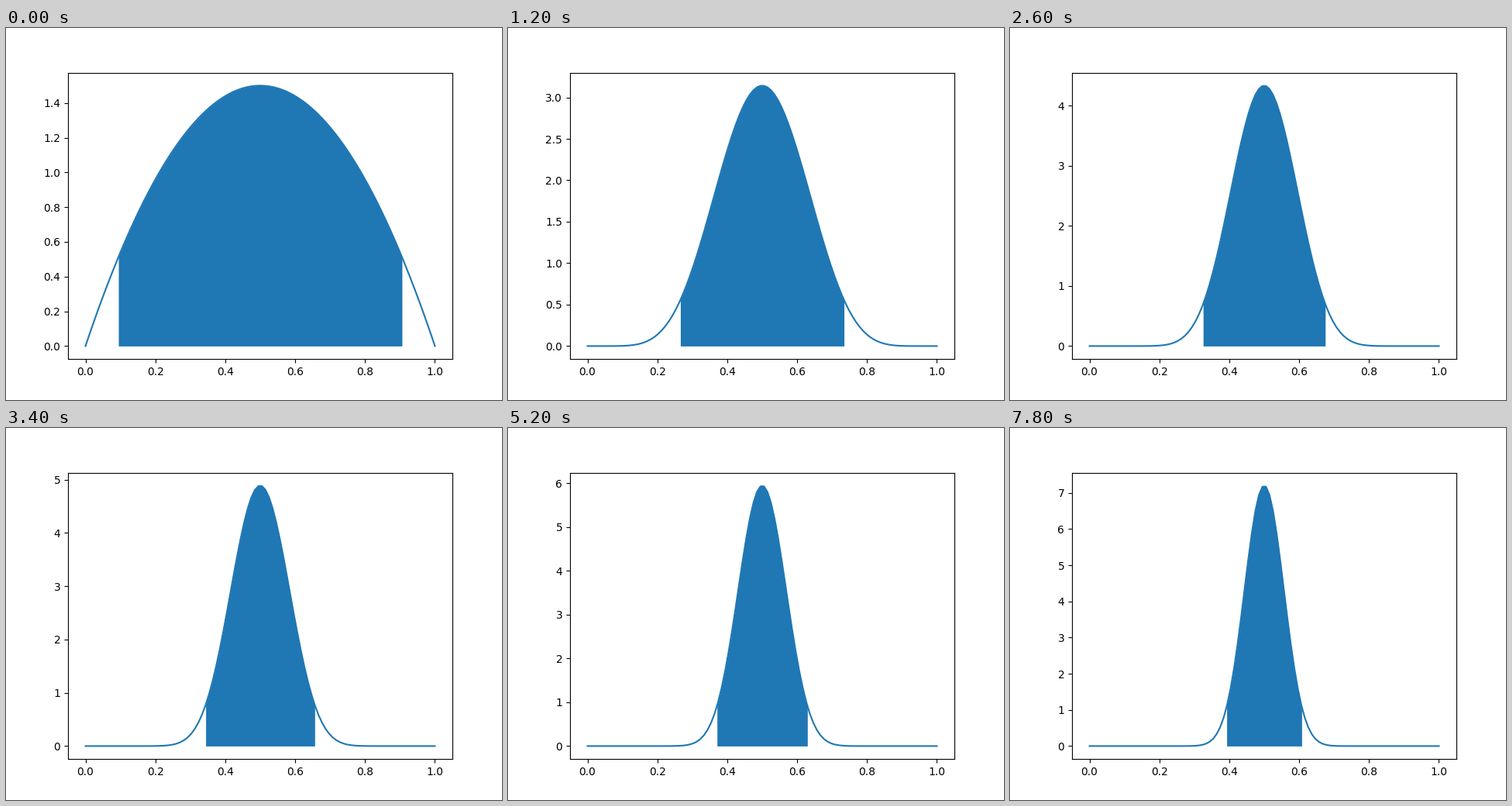
A matplotlib script for the animation above (8 s loop, 640x480 px).

```python
import math

import numpy as np
import matplotlib.pyplot as plt
from matplotlib.animation import FuncAnimation

FRAMES = 40
INTERVAL = 200
BLUE = "#1f77b4"

fig, ax = plt.subplots(figsize=(6.4, 4.8), dpi=100)
grid = np.linspace(0, 1, 100)
fine = np.linspace(0, 1, 40001)


def beta_pdf(x, a, b):
    norm = math.exp(math.lgamma(a + b) - math.lgamma(a) - math.lgamma(b))
    return norm * x ** (a - 1) * (1 - x) ** (b - 1)


def central_interval(a, b, mass=0.95):
    """Bounds of the central interval, from a numerically integrated CDF."""
    p = beta_pdf(fine, a, b)
    cdf = np.concatenate([[0], np.cumsum((p[1:] + p[:-1]) / 2)])
    cdf /= cdf[-1]
    tail = (1 - mass) / 2
    return np.interp([tail, 1 - tail], cdf, fine)


def draw(i):
    a = b = i + 2
    ax.clear()
    ax.plot(grid, beta_pdf(grid, a, b), color=BLUE)
    low, high = central_interval(a, b)
    x = np.linspace(low, high, 100)
    ax.fill_between(x, beta_pdf(x, a, b), color=BLUE, linewidth=0)
    return ax.get_children()


anim = FuncAnimation(fig, draw, frames=FRAMES, interval=INTERVAL,
                     init_func=lambda: draw(0), repeat=True, repeat_delay=0)
plt.show()
```
